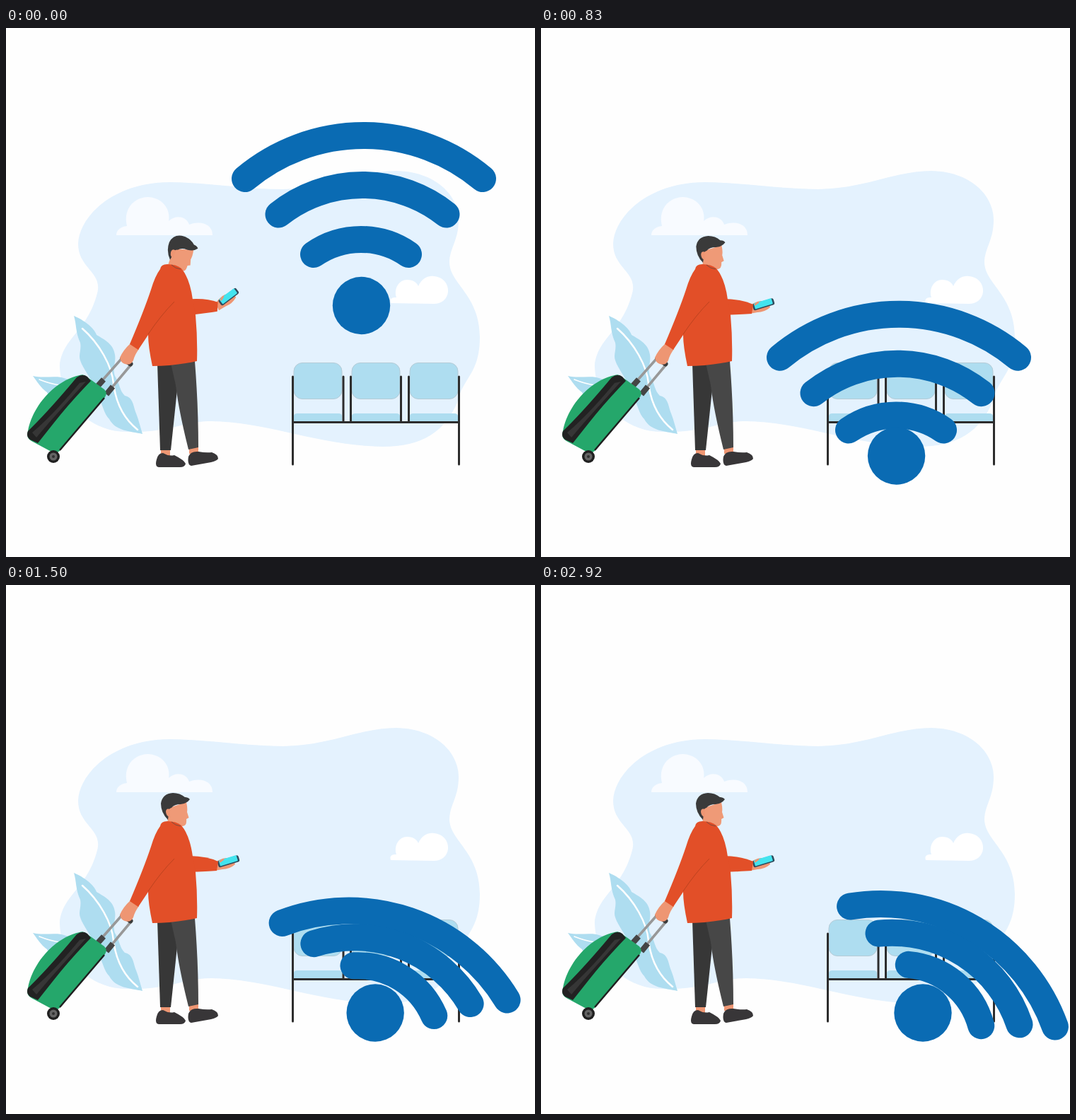
An HTML page for the animation above (3010 ms loop, 748 px wide and 748 px high).

```html
<!DOCTYPE html>
<html lang="en">
<head>
<meta charset="utf-8">
<title>Traveller and falling signal</title>
<style>
html, body { margin: 0; width: 100%; height: 100%; overflow: hidden; background: #fefefe; }
svg { display: block; width: 100vw; height: 100vh; }
</style>
</head>
<body>
<svg viewBox="0 0 748 748" xmlns="http://www.w3.org/2000/svg">
  <rect width="748" height="748" fill="#fefefe"/>
  <path fill="#e4f2fe" d="M102 305C103 268 150 218 232 218C290 219 340 228 392 228C460 227 500 202 552 202C606 203 640 235 640 272C640 300 627 312 627 332C628 362 670 378 670 437C670 490 645 495 638 530C620 570 590 592 532 592C440 590 370 557 290 556C250 556 230 573 170 571C110 570 77 520 76 480C77 440 115 430 129 375C137 345 102 340 102 305Z"/>
  <path fill="#f8fbff" d="M156 293C156 285 163 281 171 280C165 255 182 239 201 239C222 240 233 257 230 273C240 263 256 267 259 278C275 272 292 277 292 293Z"/>
  <path fill="#fff" d="M544 389C542 382 546 381 552 381C548 368 556 356 567 356C576 356 581 360 583 365C588 354 597 350 605 351C618 352 626 362 625 373C624 384 615 390 605 390Z"/>

  <g id="leaves" fill="#aeddf0">
    <path d="M38 492C55 496 72 490 85 496L100 500L80 525C70 528 62 525 58 515C50 510 44 500 38 492Z"/>
    <path d="M96 407C110 413 125 424 128 434C140 441 152 447 154 462C156 472 150 480 154 492C162 505 160 512 168 520C180 522 180 535 184 545C188 555 190 565 193 574C175 570 155 570 146 553C138 545 136 530 130 520C125 500 110 485 105 470C102 462 107 455 105 445C98 430 100 420 96 407Z"/>
    <g fill="none" stroke="#fff" stroke-linecap="round">
      <path stroke-width="2.5" d="M108 425C132 446 150 478 152 503C155 527 165 551 186 568"/>
      <path stroke-width="1.5" d="M47 497Q62 503 76 505"/>
    </g>
  </g>

  <g id="chairs"></g>

  <g id="case">
    <g stroke="#989898" stroke-width="3.6">
      <path d="M132 503L163 468M145 514L176 477"/>
      <path stroke="#454545" stroke-width="8" d="M129 507L138 497M142 518L151 507"/>
    </g>
    <path stroke="#3b3b3b" stroke-width="7" stroke-linecap="round" d="M165 467L176 475"/>
    <path fill="#25a76b" d="M31 570C36 540 64 500 104 491Q110 489 114 493L139 511Q144 516 140 522L76 598Q70 603 64 599L36 584Q28 580 31 570Z"/>
    <path fill="#222" d="M31 570Q60 542 100 494Q108 488 115 493L120 499Q90 530 68 558L45 587L34 582Q28 577 31 570Z"/>
    <path fill="#363636" d="M37 572Q66 548 104 502L113 500Q84 532 60 559L43 579Z"/>
    <path stroke="#1f1f1f" stroke-width="2.5" d="M139 523L76 597"/>
    <circle cx="67" cy="606" r="9" fill="#202020"/>
    <circle cx="67" cy="606" r="5.5" fill="#646464"/>
    <circle cx="67" cy="606" r="2" fill="#303030"/>
  </g>

  <g id="man">
    <path fill="#ee9673" d="M219 592H232V606H219ZM259 590H272V602H259Z"/>
    <path fill="#383638" d="M213 610Q215 601 222 601Q230 606 238 604Q252 611 254 616Q253 621 246 621H216Q210 620 213 610ZM258 606Q261 598 272 599Q283 601 291 600Q300 603 300 609Q298 612 290 614L262 619Q256 618 258 606Z"/>
    <path fill="#373737" d="M214 474H246L233 597H218Z"/>
    <path fill="#474747" d="M233 474L267 471Q272 535 272 593L258 596Q244 540 240 505Z"/>
    <path fill="#ee9673" d="M176 446L188 454Q182 462 180 470Q176 478 168 475Q162 473 161 466Q166 455 176 446Z"/>
    <g id="head">
      <path fill="#ef9a77" d="M228 316L255 307Q257 316 256 321L258.500 329L255 331Q256 340 250 341Q246 341 243 339L243 348L229 344Z"/>
      <path fill="#3a3a3a" d="M229 332Q219 322 219 309Q221 295 236 294Q246 294 253 300Q258 300 260 303Q256 309 247 310Q238 310 234 315Q229 316 230 324Z"/>
      <path fill="#ee9673" d="M232 317Q226 315 226 321Q227 328 232 328Z"/>
    </g>
    <g id="hold">
      <path fill="#ee9673" d="M294 393Q303 387 311 386L315 388L313 394L323 392L324 395Q316 402 306 402L295 404Z"/>
      <g transform="rotate(-17 314.500 390.500)">
        <rect x="299" y="386" width="31" height="9.500" rx="2.500" fill="#2f4a5c"/>
        <rect x="301.500" y="385.500" width="26" height="8.500" rx="1" fill="#43e4ef"/>
      </g>
      <path stroke="#ee9673" stroke-width="2.500" stroke-linecap="round" d="M303 391L307 388"/>
    </g>
    <path id="fore" fill="#e24f28" d="M255 383Q284 383 300 391L298 404Q284 405 255 406Z"/>
    <path fill="#e24f28" d="M218 341Q219 334 228 334Q241 334 248 340Q260 354 264 384L268 406Q271 440 270 471Q238 478 207 478Q201 450 201 434L187 455L175 447Q195 400 205 370Q211 350 218 341Z"/>
    <path fill="none" stroke="#bd431f" d="M238 387Q219 406 201 433"/>
    <path fill="none" stroke="#7c4b3c" d="M234 335Q239 340 247 341"/>
  </g>

  <g id="signal" fill="none" stroke="#0a6bb3" stroke-width="38" stroke-linecap="round"></g>
</svg>
<script>
const NS = "http://www.w3.org/2000/svg";
const LOOP = 3010, STEP = 250 / 3, COUNT = 36;
const DROP = 6.4, GRAVITY = 19.5;
const $ = id => document.getElementById(id);

function add(parent, tag, attrs) {
  const el = document.createElementNS(NS, tag);
  for (const k in attrs) el.setAttribute(k, attrs[k]);
  return parent.appendChild(el);
}

// Waiting-room seats
const chairs = $("chairs");
for (let i = 0; i < 3; i++) {
  const x = 407 + 82 * i;
  add(chairs, "rect", { x, y: 473.5, width: 68, height: 51, rx: 12, fill: "#aeddf0", stroke: "#b4cbd6", "stroke-width": 1 });
  add(chairs, "path", { d: `M${x} 557V549Q${x} 545 ${x + 5} 545H${x + 63}Q${x + 68} 545 ${x + 68} 549V557Z`, fill: "#aeddf0" });
}
add(chairs, "path", {
  d: "M405.5 557.5H640.5M405.5 493V617M640.5 493V617M477 493V557M487.5 493V557M558.500 493V557M569.500 493V557",
  fill: "none", stroke: "#2d2d2d", "stroke-width": 3, "stroke-linecap": "round"
});

// Each part: half chord, radius, home position, then poses [step, x, y, angle] after landing
const parts = [
  { half: 168, r: 262, x: 506, y: 213, poses: [
    [12, 510, 528.5, -2.2], [16, 532.5, 530.5, 10.4], [21, 575, 536, 29.2],
    [23, 583.5, 540, 30.8], [25, 582.5, 539.5, 30.2], [30, 582, 539.5, 30.4]] },
  { half: 118.5, r: 190, x: 504, y: 263.5, poses: [
    [12, 511, 546, -0.5], [16, 530.5, 548, 12.1], [21, 569.5, 553, 31.8],
    [23, 577.5, 557.5, 33.2], [25, 577, 557, 32.9]] },
  { half: 67, r: 117, x: 502, y: 320, poses: [
    [12, 522, 568.5, 9], [16, 536, 571, 22.7], [21, 566.5, 578.5, 41.4],
    [23, 571, 580.5, 40.5], [25, 571, 580, 40.1]] },
  { x: 502.5, y: 392.5, poses: [
    [12, 505, 605, 0], [16, 512.5, 605, 0], [21, 537.5, 605, 0],
    [23, 540.5, 605, 0], [25, 540, 605, 0]] }
];

for (const p of parts) {
  p.el = p.half
    ? add($("signal"), "path", { d: `M${-p.half} 0A${p.r} ${p.r} 0 0 1 ${p.half} 0` })
    : add($("signal"), "circle", { r: 40.7, fill: "#0a6bb3", stroke: "none" });
  const floor = p.poses[0][2];
  p.land = DROP + Math.sqrt((floor - p.y) / GRAVITY);
  p.poses.unshift([p.land, p.x, floor, 0]);
}

// Slope at pose i, flat at turning points
function slope(k, i, c) {
  if (i < 1 || i > k.length - 2) return 0;
  const a = (k[i][c] - k[i - 1][c]) / (k[i][0] - k[i - 1][0]);
  const b = (k[i + 1][c] - k[i][c]) / (k[i + 1][0] - k[i][0]);
  return a * b > 0 ? 2 * a * b / (a + b) : 0;
}

function pose(k, n, c) {
  const last = k.length - 1;
  if (n >= k[last][0]) return k[last][c];
  let i = 0;
  while (n >= k[i + 1][0]) i++;
  const w = k[i + 1][0] - k[i][0], u = (n - k[i][0]) / w, v = 1 - u;
  return k[i][c] * (1 + 2 * u) * v * v + k[i + 1][c] * u * u * (3 - 2 * u)
    + w * u * v * (slope(k, i, c) * v - slope(k, i + 1, c) * u);
}

function smooth(n, from, to) {
  const u = Math.min(1, Math.max(0, (n - from) / (to - from)));
  return u * u * (3 - 2 * u);
}

function draw(ms) {
  const n = Math.min(COUNT - 1, Math.floor((ms % LOOP + 5) / STEP));
  for (const p of parts) {
    let x = p.x, y = p.y, a = 0;
    if (n < p.land) y += GRAVITY * Math.max(0, n - DROP) ** 2;
    else [x, y, a] = [1, 2, 3].map(c => pose(p.poses, n, c));
    p.el.setAttribute("transform", `translate(${x} ${y}) rotate(${a})`);
  }
  const look = 1 - smooth(n, 2, 11), lift = 1 - smooth(n, 2, 8);
  $("head").setAttribute("transform", `rotate(${21 * look} 242 338)`);
  $("fore").setAttribute("transform", `rotate(${-5 * lift} 262 394)`);
  $("hold").setAttribute("transform", `translate(${3 * lift} ${-6 * lift}) rotate(${-20 * lift} 300 396)`);
}

const start = performance.now();
function tick() {
  draw(performance.now() - start);
  requestAnimationFrame(tick);
}
tick();
</script>
</body>
</html>
```
